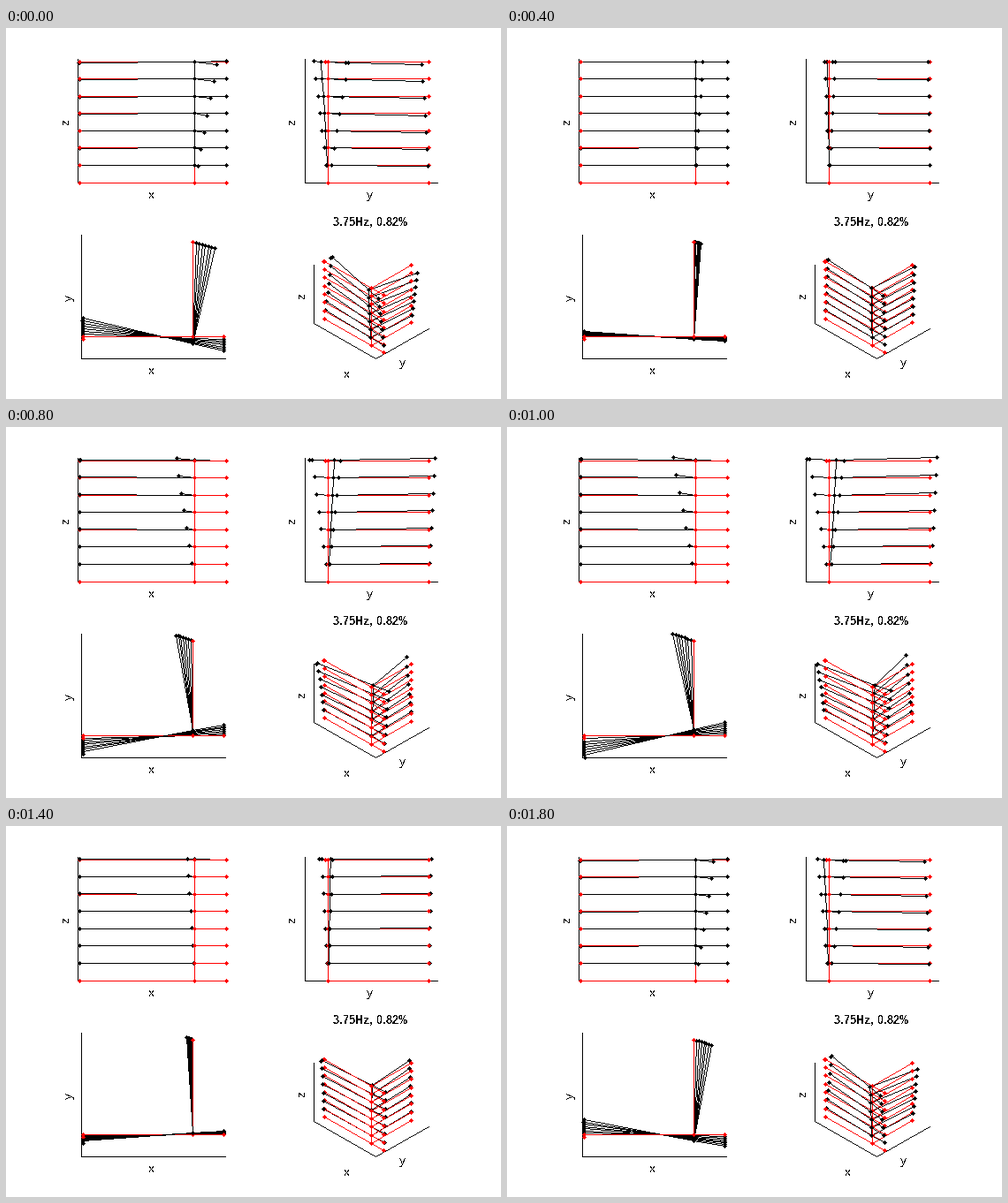
Recreate the animation shown at these times as a matplotlib script. Size 560 by 420 pixels, loop 2000 ms.

```python
import numpy as np
import matplotlib.pyplot as plt
from matplotlib.animation import FuncAnimation

W, H, DPI = 560, 420, 80
PX = 72 / DPI  # one pixel in points
FRAMES, INTERVAL = 10, 200
FLOORS, HEIGHT = 7, 137
RED, BLACK, WHITE = (255, 0, 0), (0, 0, 0), (255, 255, 255)

plt.rcParams.update({
    "font.family": "Liberation Sans",
    "text.antialiased": False,
    "text.hinting": "native",
    "text.hinting_factor": 1,
})

# Plan of an L-shaped building
WALL_Y = 26
WING, CORNER, SHORT_END, LONG_END = (2, WALL_Y), (132, WALL_Y), (168, WALL_Y), (132, 140)
BEAMS = [(WING, CORNER), (CORNER, SHORT_END), (CORNER, LONG_END)]
ROOF_POINT = (2, 23, HEIGHT)


def build(first):
    """Segments and nodes of the frame from one floor upwards."""
    z = [HEIGHT * k / FLOORS for k in range(FLOORS + 1)]
    segs = [[(*a, h), (*b, h)] for h in z[first:] for a, b in BEAMS]
    segs += [[(*CORNER, lo), (*CORNER, hi)]
             for lo, hi in zip(z[first:], z[first + 1:])]
    nodes = [(*p, h) for h in z[first:]
             for p in (WING, CORNER, SHORT_END, LONG_END)]
    return np.array(segs, float), np.array(nodes + [ROOF_POINT], float)


def sway(p, amp):
    """Twist in plan, growing with height, plus a slight tilt."""
    x, y, z = np.moveaxis(p, -1, 0)
    rise = z / HEIGHT
    dx = 0.222 * (y - WALL_Y) * rise
    dy = 0.235 * (98 - x) * rise
    dz = 0.008 * (x - 160) * rise - 0.025 * (y - WALL_Y) * np.sqrt(rise)
    return p + amp * np.stack([dx, dy, dz], axis=-1)


# Each view gives screen x, screen y and nearness to the viewer
def view_xz(x, y, z):
    return 81 + x, 174.55 - z, -y


def view_yz(x, y, z):
    return 338.3 + y, 174.55 - z, x


def view_xy(x, y, z):
    return 85 + 0.957 * x, 374 - 0.945 * y, z


def view_3d(x, y, z):
    return (348.5 + 0.408 * x + 0.4 * y,
            334.5 + 0.231 * x - 0.229 * y - 0.477 * z,
            x - y + 0.8 * z)


def project(view, pts):
    sx, sy, near = view(*np.moveaxis(pts, -1, 0))
    pix = np.floor(np.stack([sx, sy], axis=-1) + 0.5).astype(int)
    return pix, near


def draw_line(img, a, b, color):
    """One-pixel line without smoothing."""
    n = max(abs(b[0] - a[0]), abs(b[1] - a[1])) + 1
    xs = np.floor(np.linspace(a[0], b[0], n) + 0.5).astype(int)
    ys = np.floor(np.linspace(a[1], b[1], n) + 0.5).astype(int)
    img[ys, xs] = color


def draw_dot(img, c, color, r=2):
    for d in range(-r, r + 1):
        half = r - abs(d)
        img[c[1] + d, c[0] - half:c[0] + half + 1] = color


def draw_view(img, view, parts):
    lines, dots = [], []
    for color, segs, nodes in parts:
        pix, near = project(view, segs)
        lines += [(n, p, color) for n, p in zip(near.max(axis=1), pix)]
        pix, near = project(view, nodes)
        dots += [(n, p, color) for n, p in zip(near, pix)]
    for _, (a, b), color in sorted(lines, key=lambda s: s[0]):
        draw_line(img, a, b, color)
    for _, c, color in sorted(dots, key=lambda s: s[0]):
        draw_dot(img, c, color)


def corner_axes(x, top, bottom, right):
    return [(x, top), (x, bottom), (right, bottom)]


PANELS = [
    (view_xz, corner_axes(81, 35, 175, 250)),
    (view_yz, corner_axes(338, 35, 175, 488)),
    (view_xy, corner_axes(85, 234, 374, 248)),
    (view_3d, [(348, 268), (348, 334), (418, 374), (478, 340)]),
]

still = build(0)
moving = build(1)
blank = np.full((H, W, 3), WHITE, np.uint8)
for _, path in PANELS:
    for a, b in zip(path, path[1:]):
        draw_line(blank, a, b, BLACK)

fig = plt.figure(figsize=(W / DPI, H / DPI), dpi=DPI, facecolor="white")
ax = fig.add_axes([0, 0, 1, 1])
ax.axis("off")
picture = ax.imshow(blank, interpolation="nearest", aspect="auto")


def label(x, y, text, size=13, **kw):
    ax.text(x, y, text, fontsize=size * PX, ha="center", color="black", **kw)


for x, y, text in [(164, 193, "x"), (411, 193, "y"), (164, 392, "x"),
                   (385, 396, "x"), (448, 383, "y")]:
    label(x, y, text, va="baseline")
for x, y, text in [(67, 105, "z"), (323, 105, "z"),
                   (71, 305, "y"), (334, 302, "z")]:
    label(x, y, text, va="center", rotation=90)
label(411.5, 224, "3.75Hz, 0.82%", weight="bold", va="baseline")


def update(i):
    amp = np.cos(2 * np.pi * i / FRAMES)
    parts = [(RED, *still), (BLACK, *(sway(p, amp) for p in moving))]
    img = blank.copy()
    for view, _ in PANELS:
        draw_view(img, view, parts)
    picture.set_data(img)
    return [picture]


anim = FuncAnimation(fig, update, frames=FRAMES, interval=INTERVAL,
                     repeat=True, repeat_delay=0, blit=False)
plt.show()
```
